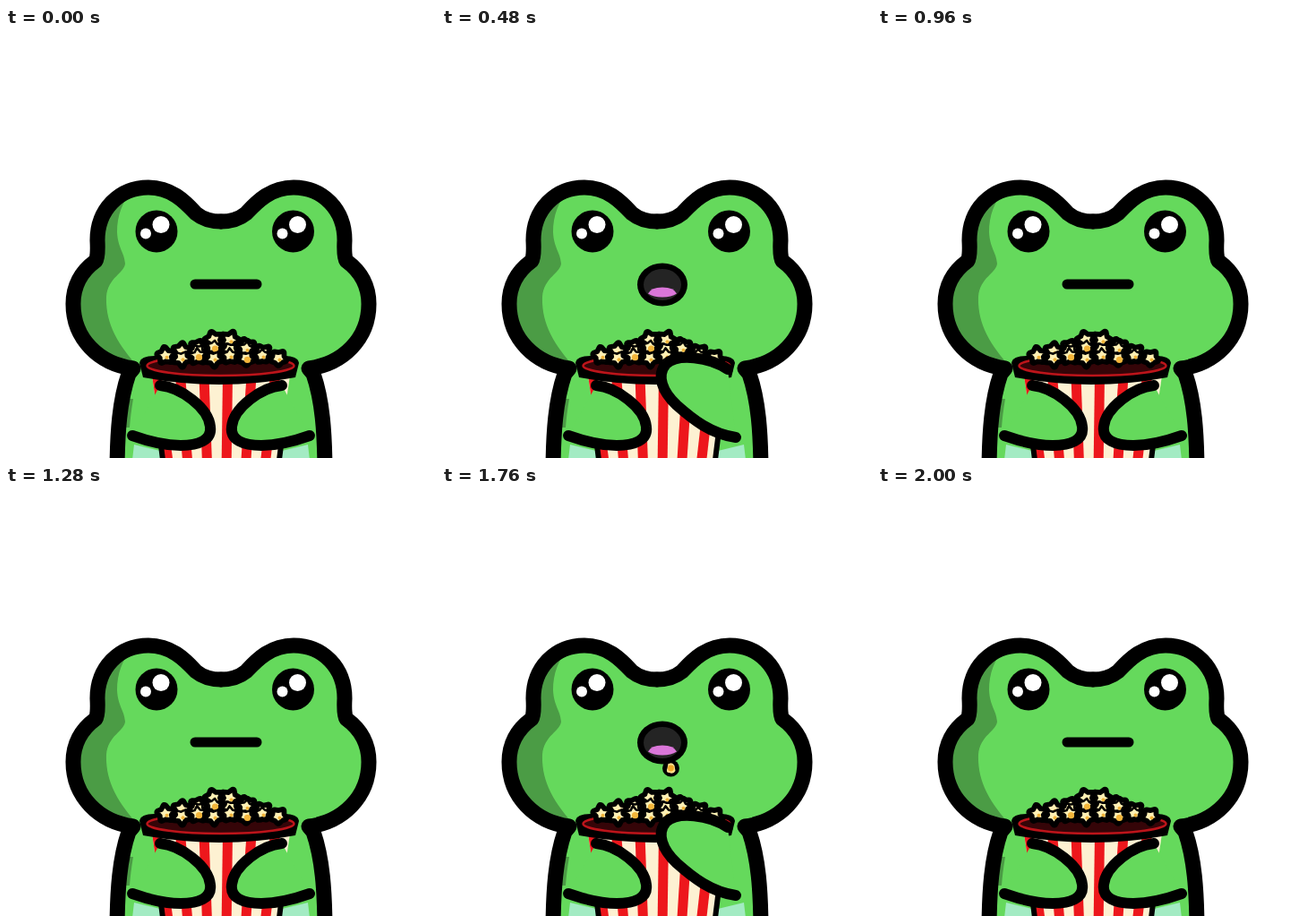
These frames come from a looping animation (480x480 px, 2080 ms). An HTML page:

```html
<!DOCTYPE html>
<html lang="en">
<head>
<meta charset="utf-8">
<title>Frog eating popcorn</title>
<style>
html, body { margin: 0; width: 100%; height: 100%; overflow: hidden; background: #fff; }
svg { display: block; width: 100vw; height: 100vh; }
.line { stroke: #000; stroke-linecap: round; stroke-linejoin: round; }
.skin { fill: #65d95c; }
.shade { fill: #4b9c45; }
</style>
</head>
<body>
<svg viewBox="0 0 480 480">
  <defs>
    <path id="half" d="M240 500H124C124 450 127 415 137 386L142 380C104 375 75 347 75 308C75 286 85 271 100 260Q103 256 102 237C102 203 126 178 159 178C184 178 199 193 212 207Q223 216 240 216"/>
    <clipPath id="inside"><use href="#half"/></clipPath>
    <clipPath id="cup"><path d="M163 388H317L303 482H177Z"/></clipPath>
    <g id="eye">
      <circle r="23.5"/>
      <ellipse cx="5" cy="-7.5" rx="9.5" ry="9.5" fill="#fff"/>
      <circle cx="-12" cy="2.5" r="6" fill="#fff"/>
    </g>
    <path id="hug" class="line skin" d="M172 399C195 401 226 424 228 445C230 460 215 466 195 466C175 466 155 460 141 455" stroke-width="12"/>
  </defs>

  <g id="body">
    <g class="skin"><use href="#half"/><use href="#half" transform="matrix(-1 0 0 1 480 0)"/></g>
    <g clip-path="url(#inside)">
      <path class="shade" d="M60 170H150C131 190 124 207 124 228C125 246 132 250 133 263C132 274 114 278 112 300C111 328 123 352 150 381H60Z"/>
      <path class="shade" d="M120 414H142Q139 432 138 446H120Z"/>
    </g>
    <path d="M143 465L172 472V482H141ZM337 465L308 472V482H339Z" fill="#a3ebc3"/>
    <g class="line" fill="none" stroke-width="17">
      <use href="#half"/><use href="#half" transform="matrix(-1 0 0 1 480 0)"/>
    </g>
  </g>

  <use href="#eye" x="168" y="227"/>
  <use href="#eye" x="320.5" y="227"/>

  <g id="kernel">
    <circle cy="-1" r="9.5"/>
    <path d="M-3 -6Q2 -8 4 -4L5 2Q3 6 -2 4Q-6 4 -4 -1Z" fill="#ffe08c"/>
    <circle cy="-1" r="3.4" fill="#f0a92b"/>
  </g>

  <path id="shut" class="line" d="M211 286H280" stroke-width="11"/>
  <g id="open" transform="translate(246 286.5)">
    <ellipse rx="28" ry="24"/>
    <ellipse rx="21" ry="17.5" fill="#242424"/>
    <path d="M-16 10Q-13 3 0 3Q13 3 16 10Q10 14 0 14Q-10 14 -16 10Z" fill="#da76d9"/>
  </g>

  <g id="bucket">
    <path d="M163 388H317L303 482H177Z" fill="#fdf1d2"/>
    <g id="stripes" clip-path="url(#cup)" stroke="#ed171c" stroke-width="11"></g>
    <path class="line" d="M171 450L175 482M309 450L305 482" fill="none" stroke-width="6"/>
    <path d="M149 374Q150 366 166 366H310Q326 366 327 374L323 390Q238 406 153 390Z"/>
    <ellipse cx="239.5" cy="377" rx="82" ry="11" fill="#350508" stroke="#bd141a" stroke-width="2.5"/>
    <g id="corn" class="line"></g>
  </g>

  <use href="#hug"/>
  <use id="rest" href="#hug" transform="matrix(-1 0 0 1 480 0)"/>
  <path id="reach" class="line skin" d="M319 381C298 367 263 363 250 375C239 388 246 406 262 421C280 437 300 453 328 457" stroke-width="12"/>
</svg>
<script>
const $ = id => document.getElementById(id);
const STEP = 80, STEPS = 13;
const range = (n, f) => Array.from({ length: n }, (_, i) => f(i));
const show = (id, on) => $(id).style.display = on ? '' : 'none';

// Evenly spaced stripes that narrow towards the bottom of the bucket
$('stripes').innerHTML = range(6, i => 168 + 26.5 * i)
  .map(x => `<path d="M${x} 388L${240 + (x - 240) * .82} 484"/>`).join('');

// Popped kernels: lumpy five-pointed stars
function star(x, y, turn) {
  return range(10, k => {
    const a = k * Math.PI / 5 + turn;
    const r = k % 2 ? 5.2 : 8.6 + Math.sin(turn * 7 + k * 3);
    return [x + r * Math.cos(a), y + r * .9 * Math.sin(a)].map(v => v.toFixed(1));
  }).join(' ');
}

// Three rows heaped into a dome, back row first
const kernels = range(3, row => range(4 + 2 * row, i => {
  const side = i / (3 + 2 * row) * 2 - 1;
  const turn = row * 2.3 + i * 1.9;
  return {
    x: 241 + side * (27 + 18 * row),
    y: 347 + 10 * row + 5 * side * side * (2 - row) + 1.5 * Math.sin(turn * 5),
    turn
  };
})).flat();
const pile = kernels.map(({ x, y, turn }) =>
  `<polygon points="${star(x, y, turn)}" stroke-width="9"/>`);
const corn = kernels.map(({ x, y, turn }, i) =>
  `<polygon points="${star(x, y, turn)}" fill="#fff0b4" stroke-width="2.5"/>
   <circle cx="${x + 1.5}" cy="${y + 2}" r="${i % 3 ? 2 : 3.6}" fill="#f3b53a" stroke="none"/>`);
$('corn').innerHTML = pile.join('') + corn.join('');

function draw(now) {
  const step = Math.floor(now / STEP) % STEPS;
  const eating = step > 4 && step < 11;
  show('rest', !eating);
  show('shut', !eating);
  show('reach', eating);
  show('open', eating);

  // The kernel rises from the bucket and vanishes into the mouth
  show('kernel', step > 6 && step < 11);
  $('kernel').setAttribute('transform', `translate(255.5 ${316 + (9 - step) * 16})`);
  requestAnimationFrame(draw);
}
draw(performance.now());
</script>
</body>
</html>
```
